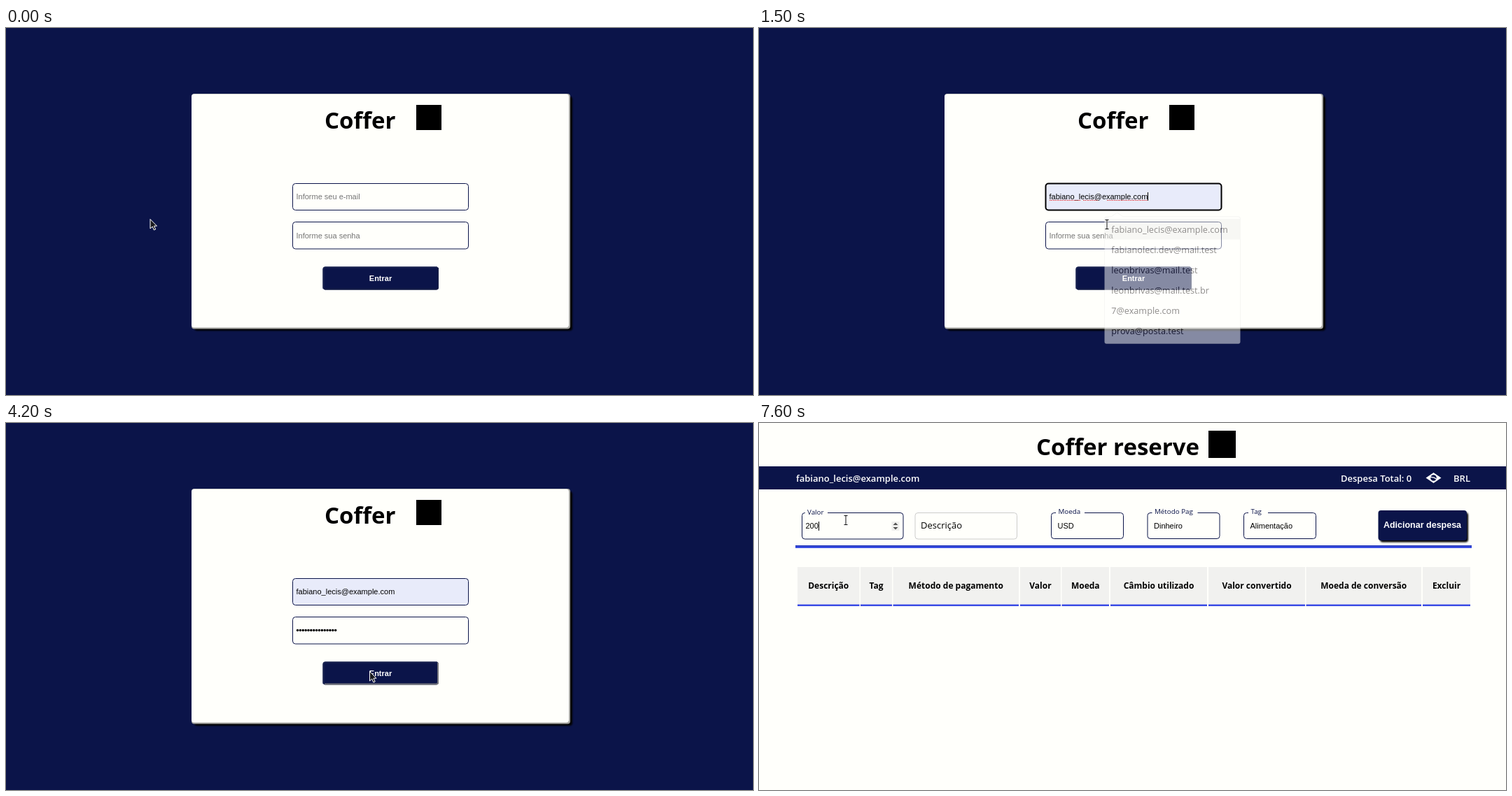
Animation, 1067 px wide and 525 px high, one loop 8000 ms. Source, as an HTML page:

```html
<!DOCTYPE html>
<html lang="pt-BR">
<head>
<meta charset="utf-8">
<title>Coffer</title>
<style>
html, body { margin: 0; width: 100%; height: 100%; overflow: hidden; background: #0b1449; }
svg { display: block; font: 13px "Open Sans", "Noto Sans", sans-serif; }
.ui { font: 11px "Liberation Sans", Arial, sans-serif; }
.hint { fill: #757575; }
.title { font-size: 33px; font-weight: 700; }
.box { fill: #fffffb; stroke: #0b1449; }
.light { fill: #fff; font-weight: 600; }
</style>
</head>
<body>
<svg width="1067" height="525" viewBox="0 0 1067 525">
  <defs>
    <filter id="soft" x="-10%" y="-10%" width="120%" height="130%"><feGaussianBlur stdDeviation="1.3"/></filter>
  </defs>

  <g id="login">
    <rect width="1067" height="525" fill="#0b1449"/>
    <rect x="269" y="98" width="540" height="335" rx="4" filter="url(#soft)"/>
    <rect x="265" y="94" width="541" height="336.500" rx="4" fill="#a6a6a2"/>
    <rect x="265" y="94.500" width="539" height="334" rx="4" fill="#fffffb"/>
    <text class="title" x="455" y="144">Coffer</text>
    <rect x="586" y="110" width="36" height="36"/>

    <rect id="emailBox" class="box" x="409.500" y="222.500" width="251" height="38" rx="4"/>
    <text id="email" class="ui" x="414.500" y="245"></text>
    <path id="spell" d="M415 246.500h45m3 0h21m13 0h58" fill="none" stroke="#d33" stroke-dasharray="1.500 1"/>

    <rect id="passBox" class="box" x="409.500" y="277.500" width="251" height="38.500" rx="4"/>
    <text id="passHint" class="ui hint" x="414.500" y="300.500">Informe sua senha</text>
    <g id="dots"></g>

    <rect x="452.500" y="341.500" width="165.500" height="33" rx="4" fill="#0b1449"/>
    <path id="edgeTop" d="M453.500 373V345q0-2.500 2.500-2.500H616" fill="none" stroke-width="2"/>
    <path id="edgeBottom" d="M617 343v28q0 2.500-2.500 2.500H455" fill="none" stroke-width="2"/>
    <text class="ui light" x="535" y="362" text-anchor="middle" style="font-weight:700">Entrar</text>

    <g id="menu">
      <path d="M494 267.500h7l8.500-6 8.500 6h169q3 0 3 3V451q0 3-3 3H494q-3 0-3-3V270.500q0-3 3-3z" fill="#fffffd" stroke="#000" stroke-opacity=".08"/>
      <rect id="hover" x="491" y="271" width="199" height="30" fill="#f0f0ee"/>
      <g id="items" fill="#241f21"></g>
    </g>
  </g>

  <g id="home">
    <rect width="1067" height="525" fill="#fffffb"/>
    <text class="title" x="396" y="46">Coffer reserve</text>
    <rect x="642" y="11" width="39" height="39"/>
    <rect y="62" width="1067" height="33" fill="#0b1449"/>
    <g class="light">
      <text id="account" x="53" y="83.500"></text>
      <text x="831" y="83.500">Despesa Total: 0</text>
      <text x="992" y="83.500">BRL</text>
      <path d="M952.500 78.500l11-7.500 11 7.500-11 7.500z"/>
      <circle cx="963.500" cy="78.500" r="4.300" fill="#0b1449"/>
      <path d="M959 77.500q5-.5 9 3" fill="none" stroke="#fff" stroke-width="1.300"/>
    </g>
    <rect id="valueBox" class="box" x="61.500" y="128.500" width="144.500" height="37.500" rx="4"/>
    <rect id="valueGap" x="66" y="127" width="32" height="3" fill="#fffffb"/>
    <text id="valueLabel" x="69">Valor</text>
    <text id="value" class="ui" x="66.500" y="151"></text>
    <g id="spinner">
      <rect x="189.500" y="141" width="11" height="13" fill="#efefed"/>
      <path d="M191.500 146l3.500-3.500 3.500 3.500zm0 3l3.500 3.500 3.500-3.500z" fill="#505050"/>
    </g>
    <rect class="box" x="223" y="128.500" width="145.500" height="37.500" rx="4" style="stroke:#ccc"/>
    <text x="231" y="151">Descrição</text>
    <g id="selects"></g>
    <rect x="887" y="128" width="126" height="42.500" rx="4" filter="url(#soft)"/>
    <rect x="884.500" y="125" width="126.500" height="43" rx="4" fill="#0b1449"/>
    <text class="ui light" x="947.500" y="150" text-anchor="middle" style="font-size:12.500px;font-weight:700">Adicionar despesa</text>
    <rect x="52" y="175" width="966" height="4" fill="#3a4fe4"/>
    <rect x="52" y="175" width="966" height="1.500" fill="#2336b8"/>
    <g id="table" font-size="12" font-weight="700" text-anchor="middle"></g>
  </g>

  <path id="caret" stroke="#000"/>
  <path id="arrow" d="M.5.500v13.500l3.200-3 2.200 5 2.300-1-2.200-4.800h4z" fill="#1a1a1e" stroke="#fff" stroke-width="1"/>
  <g id="beam" fill="none">
    <path d="M-2.500-6.500h5M0-6.500v13M-2.500 6.500h5" stroke="#fff" stroke-width="2.500" opacity=".7"/>
    <path d="M-2.500-6.500h5M0-6.500v13M-2.500 6.500h5" stroke="#111"/>
  </g>
</svg>

<script>
const $ = id => document.getElementById(id);
const show = (id, on) => $(id).style.display = on ? '' : 'none';
const set = (id, attrs) => { for (const k in attrs) $(id).setAttribute(k, attrs[k]); };

const EMAIL = 'fabiano_lecis@example.com';
const DOT = 3.87;

$('account').textContent = EMAIL;
$('items').innerHTML = [EMAIL, 'fabianoleci.dev@mail.test', 'leonbrivas@mail.test',
  'leonbrivas@mail.test.br', '7@example.com', 'prova@posta.test']
  .map((s, i) => `<text x="501" y="${291 + i * 29.8}">${s}</text>`).join('');

$('dots').innerHTML = Array.from({ length: 15 }, (_, i) =>
  `<circle cx="${416.5 + i * DOT}" cy="296.500" r="1.700"/>`).join('');

$('selects').innerHTML = [[418, 'Moeda', 'USD', 41], [555.5, 'Método Pag', 'Dinheiro', 65], [693, 'Tag', 'Alimentação', 28]]
  .map(([x, label, value, gap]) => `
    <rect class="box" x="${x - .5}" y="128.500" width="103" height="37" rx="4"/>
    <rect x="${x + 6}" y="127" width="${gap}" height="3" fill="#fffffb"/>
    <text x="${x + 9.5}" y="130" font-size="9.800" fill="#0b1449">${label}</text>
    <text class="ui" x="${x + 8.5}" y="151">${value}</text>`).join('');

$('table').innerHTML = [[55, 143.5, 'Descrição'], [145, 190, 'Tag'], [191.5, 371, 'Método de pagamento'],
  [373, 431, 'Valor'], [432.5, 500, 'Moeda'], [502, 640, 'Câmbio utilizado'], [642, 780, 'Valor convertido'],
  [781.5, 946, 'Moeda de conversão'], [948, 1016, 'Excluir']]
  .map(([a, b, label]) => `
    <rect x="${a}" y="206" width="${b - a}" height="53.500" fill="#f1f1ef"/>
    <rect x="${a}" y="259.500" width="${b - a}" height="2.500" fill="#3a4be4"/>
    <text x="${(a + b) / 2}" y="237">${label}</text>`).join('');

// Pointer path: time, x, y
const path = [[0, 205.5, 273], [300, 372, 304], [400, 438, 303], [500, 438, 303], [700, 480, 241],
  [900, 480, 241], [1200, 497, 281], [1600, 497, 281], [1800, 475, 304], [3700, 475, 304],
  [4100, 519, 355], [5300, 519, 355], [5700, 345, 270], [6000, 140, 145], [6100, 124, 139]];

function pointer(t) {
  const i = path.findIndex(p => p[0] > t);
  if (i < 0) return path.at(-1).slice(1);
  const [t0, x0, y0] = path[i - 1], [t1, x1, y1] = path[i];
  const k = (t - t0) / (t1 - t0);
  return [x0 + (x1 - x0) * k, y0 + (y1 - y0) * k];
}

// Last value whose start time has passed
const step = (t, ...pairs) => pairs.reduce((v, [from, next]) => t >= from ? next : v, pairs[0][1]);

const within = (x, y, l, top, r, b) => x >= l && x <= r && y >= top && y <= b;

function focusBox(id, on) {
  set(id, { 'stroke-width': on ? 2 : 1 });
  $(id).style.stroke = on ? '#000' : '';
}

function drawLogin(t) {
  const filled = t >= 1200, onEmail = t >= 800 && t < 2000, onPass = t >= 2000 && t < 4200;
  focusBox('emailBox', onEmail);
  focusBox('passBox', onPass);
  $('emailBox').style.fill = filled ? '#e8ebfa' : '';
  $('email').textContent = filled ? EMAIL : 'Informe seu e-mail';
  $('email').classList.toggle('hint', !filled);
  show('spell', t >= 1400 && t < 2000);

  const count = step(t, [0, 0], [2600, 1], [3100, 4], [3200, 6], [3300, 8], [3400, 11], [3500, 13], [3700, 15]);
  show('passHint', !count);
  [...$('dots').children].forEach((dot, i) => dot.style.display = i < count ? '' : 'none');

  const pressed = t >= 4200, enabled = count >= 8;
  set('edgeTop', { stroke: enabled && !pressed ? '#62626a' : '#17204f' });
  set('edgeBottom', { stroke: pressed ? '#77777d' : enabled ? '#1c1c2c' : '#121a45' });

  const opacity = step(t, [0, 0], [800, .5], [900, 1], [1400, .85], [1500, .5], [1600, .15], [1700, 0]);
  const scale = .95 + .05 * opacity;
  show('menu', opacity);
  show('hover', t >= 1200);
  set('menu', { opacity, transform: `translate(590.5 361) scale(${scale}) translate(-590.5 -361)` });

  if (onEmail) return filled ? (t < 1400 ? null : [555.5, 235, 247]) : [414.5, 235, 247];
  return onPass ? [414.5 + count * DOT, 291, 303] : null;
}

function drawHome(t, inValue) {
  const focused = t >= 6300, lift = step(t, [0, 0], [6300, .7], [6500, 1]);
  const digits = step(t, [0, ''], [7000, '2'], [7500, '20'], [7600, '200']);
  $('valueBox').style.stroke = focused ? '' : '#ccc';
  show('valueGap', lift === 1);
  set('valueLabel', { y: 151 - 20 * lift, 'font-size': 13 - 3.2 * lift, fill: focused ? '#0b1449' : '#000' });
  $('value').textContent = digits;
  show('spinner', inValue);
  return focused && (t < 6800 || t >= 7000) ? [66.5 + digits.length * 6.4, 141, 154] : null;
}

function draw(now) {
  const t = Math.floor(now % 8000 / 100) * 100;
  const loggedIn = t >= 4500;
  const [x, y] = pointer(t);
  const inValue = loggedIn && within(x, y, 61, 128, 206, 166);
  const overMenu = t >= 1100 && t < 1500;
  const beam = inValue || !loggedIn && !overMenu &&
    (within(x, y, 409, 222, 661, 261) || within(x, y, 409, 277, 661, 316));

  show('login', !loggedIn);
  show('home', loggedIn);
  const caret = loggedIn ? drawHome(t, inValue) : drawLogin(t);
  show('caret', caret);
  if (caret) set('caret', { d: `M${Math.floor(caret[0]) + .5} ${caret[1]}V${caret[2]}` });
  show('arrow', !beam);
  show('beam', beam);
  set(beam ? 'beam' : 'arrow', { transform: `translate(${x} ${y})` });
}

let start;
function tick(now) {
  start ??= now;
  draw(now - start);
  requestAnimationFrame(tick);
}
draw(0);
requestAnimationFrame(tick);
</script>
</body>
</html>
```
